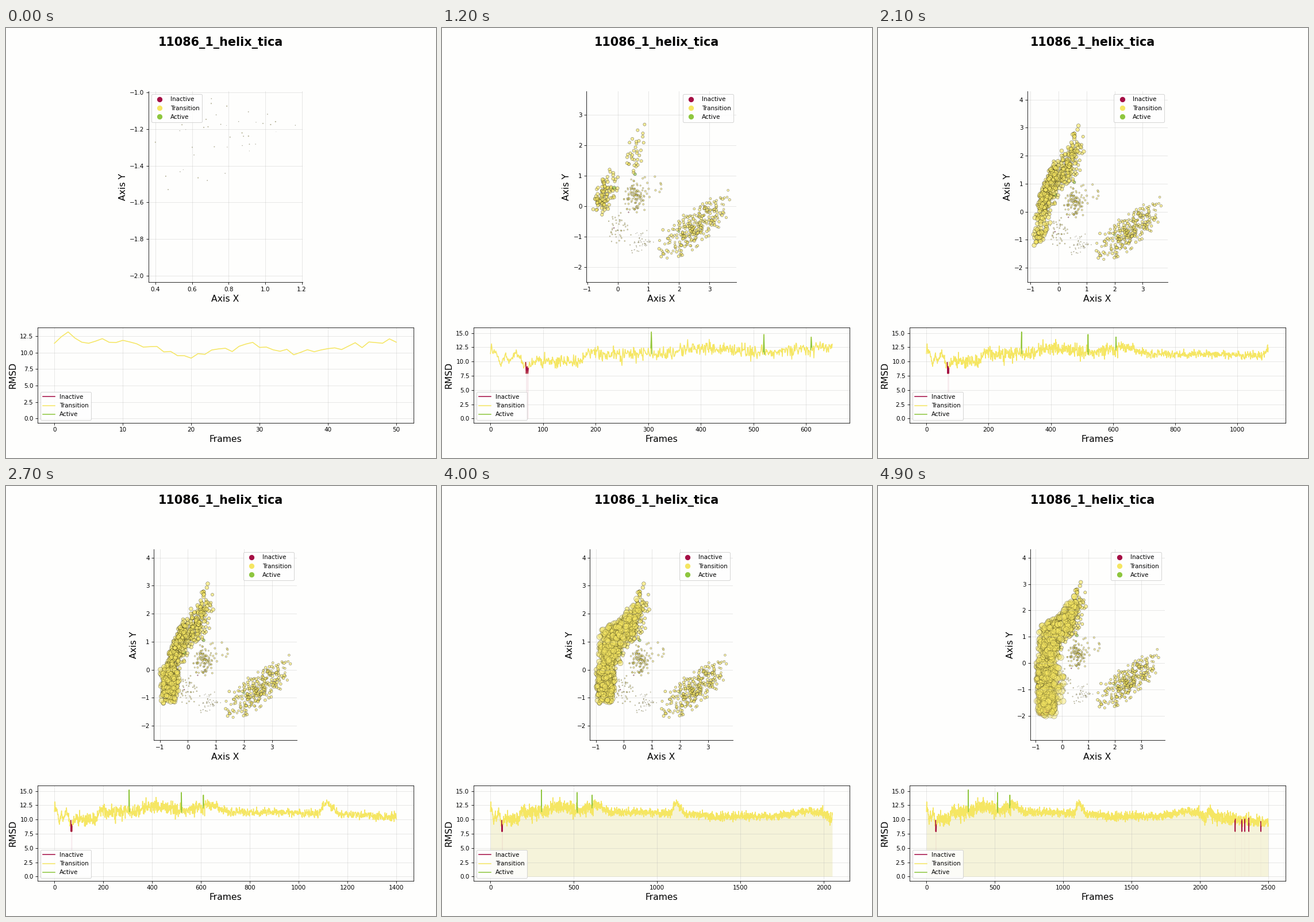
A matplotlib script that plays this animation: 748 by 748 pixels, repeating every 5 s.

```python
import numpy as np
import matplotlib.pyplot as plt
from matplotlib.animation import FuncAnimation
from matplotlib.colors import to_rgb
from matplotlib.lines import Line2D

SIZE, DPI = 748, 74.8
FRAMES, STEP = 50, 50
TOTAL = FRAMES * STEP + 1
COLORS = {"Inactive": "#a50f45", "Transition": "#f5e663", "Active": "#8ec63f"}
INACTIVE, TRANSITION, ACTIVE = range(3)
PAPER = "#fefefd"
rng = np.random.default_rng(7)
index = np.arange(TOTAL)

# Key points of the RMSD trend: sample, level
TREND = [(0, 11.4), (2, 13.2), (4, 11.7), (10, 11.7), (20, 9.7), (29, 11.5),
         (35, 9.9), (48, 11.6), (70, 8.7), (85, 10.2), (170, 10.1),
         (185, 11.5), (345, 11.3), (370, 12.4), (460, 12.3), (510, 11.7),
         (650, 12.5), (700, 11.4), (1080, 11.1), (1115, 13.1), (1160, 11.1),
         (1330, 10.5), (1700, 10.6), (1900, 11.4), (2000, 11.2), (2045, 10),
         (2070, 11.9), (2090, 10.5), (2300, 9.9), (2500, 9.4)]
LOWS = [68, 71, 2258, 2306, 2328, 2358, 2446]
HIGHS = [306, 520, 610]

# Regions visited in turn: end sample, x range, y range, correlation
REGIONS = [
    (51, (.40, 1.165), (-1.53, -.80), 0),
    (95, (-.30, .35), (-1.2, -.2), 0),
    (205, (.20, .95), (-.2, .95), .1),
    (215, (.90, 1.42), (.3, .97), 0),
    (505, (1.35, 3.66), (-1.70, .52), .75),
    (540, (.30, .92), (1.1, 2.68), .5),
    (650, (-.81, 0), (-.28, 1.2), .4),
    (780, (-.35, .5), (.7, 2.1), .5),
    (860, (.10, .9), (1.1, 3.07), .7),
    (1040, (-.75, 0), (-.2, 1.8), .8),
    (1100, (-.89, -.3), (-1.2, 0), .3),
    (1550, (-.983, -.33), (-1.18, .2), 0),
    (1850, (-.90, -.1), (-.35, 1.65), .3),
    (2150, (-.70, .55), (.3, 2.53), .8),
    (2250, (-.65, .05), (-1.75, .35), 0),
    (TOTAL, (-.95, -.25), (-2.0, -.95), 0)]


def spread(values, low, high):
    """Scale values so that they span exactly low to high."""
    return low + (high - low) * (values - values.min()) / np.ptp(values)


def make_rmsd():
    noise = np.interp(index, [0, 50, 60, 600, 700, 1900, 2050],
                      [.3, .3, .65, .65, .36, .34, .55])
    y = np.interp(index, *zip(*TREND)) + noise * rng.normal(size=TOTAL)
    y = np.clip(y, 8.8, 13.9)
    state = np.full(TOTAL, TRANSITION)
    y[LOWS], state[LOWS] = 7.9, INACTIVE
    y[HIGHS], state[HIGHS] = np.linspace(15.2, 14.3, len(HIGHS)), ACTIVE
    return y, state


def make_points():
    parts, start = [], 0
    for end, x_range, y_range, corr in REGIONS:
        u, v = rng.triangular(-1, 0, 1, size=(2, end - start))
        v = corr * u + (1 - corr ** 2) ** .5 * v
        parts.append(np.column_stack([spread(u, *x_range),
                                      spread(v, *y_range)]))
        start = end
    points = np.vstack(parts)
    points[HIGHS[1]] = .56, 1.05
    return points


rmsd, state = make_rmsd()
points = make_points()
sizes = .048 * (index + 1)
alphas = np.interp(index, [0, 500, 1000, 2500], [.45, .65, .65, .42])
faces = np.column_stack([np.array([to_rgb(c) for c in COLORS.values()])[state],
                         alphas])
edges = np.column_stack([np.zeros((TOTAL, 3)), .85 * alphas])


def around(kind):
    """Mark samples of one state together with their direct neighbours."""
    return np.convolve(state == kind, [1, 1, 1], "same") > 0


near = {kind: around(kind) for kind in (INACTIVE, ACTIVE)}


def pixel_axes(left, top, right, bottom):
    return fig.add_axes([left / SIZE, 1 - bottom / SIZE,
                         (right - left) / SIZE, (bottom - top) / SIZE])


fig = plt.figure(figsize=(SIZE / DPI, SIZE / DPI), dpi=DPI, facecolor=PAPER)
fig.suptitle("11086_1_helix_tica", x=373.4 / SIZE, fontsize=20,
             fontweight="bold")
map_ax = pixel_axes(54.6, 110, 708.6, 442.3)
line_ax = pixel_axes(54.6, 521.2, 708.6, 686.8)


def prepare(ax, xlabel, ylabel):
    ax.clear()
    ax.set_facecolor(PAPER)
    ax.grid(color="#b0b0b0", alpha=.35, linewidth=.8)
    ax.set_xlabel(xlabel, fontsize=15)
    ax.set_ylabel(ylabel, fontsize=15)


def add_legend(ax, loc, dots=False):
    def handle(name, color):
        if dots:
            return Line2D([0], [0], marker="o", color="w", markersize=10,
                          markerfacecolor=color, label=name)
        return Line2D([0], [0], color=color, label=name)

    ax.legend(handles=[handle(*item) for item in COLORS.items()], loc=loc)


def draw_map(n):
    prepare(map_ax, "Axis X", "Axis Y")
    x, y = points[:n].T
    map_ax.scatter(x, y, s=sizes[:n], c=faces[:n], edgecolors=edges[:n],
                   linewidths=.5)
    pad_x, pad_y = .05 * np.ptp(x), .05 * np.ptp(y)
    map_ax.set_xlim(x.min() - pad_x, x.max() + pad_x)
    map_ax.set_ylim(1.3 * (y.min() - pad_y), 1.3 * (y.max() + pad_y))
    map_ax.set_aspect("equal", adjustable="box")
    map_ax.spines[["top", "right"]].set_visible(False)
    add_legend(map_ax, "best", dots=True)


def draw_line(n, filled):
    prepare(line_ax, "Frames", "RMSD")
    x, y = index[:n], rmsd[:n]
    names = list(COLORS)
    if filled:
        line_ax.fill_between(x, y, color="#f5f3da", linewidth=0, zorder=.5)
    line_ax.fill_between(x, y, where=near[INACTIVE][:n], alpha=.08,
                         color=COLORS["Inactive"], linewidth=0, zorder=.6)
    line_ax.plot(x, y, color=COLORS["Transition"])
    for kind, mask in near.items():
        line_ax.plot(x, np.where(mask[:n], y, np.nan),
                     color=COLORS[names[kind]])
    margin = .05 * (n - 1)
    line_ax.set_xlim(-margin, n - 1 + margin)
    line_ax.set_ylim(-.05 * y.max(), 1.05 * y.max())
    add_legend(line_ax, "lower left")


def update(frame):
    n = STEP * (frame + 1) + 1
    draw_map(n)
    draw_line(n, filled=frame > 30)
    return []


anim = FuncAnimation(fig, update, frames=FRAMES, interval=100, repeat=True,
                     repeat_delay=0, init_func=lambda: [], blit=False)
plt.show()
```
